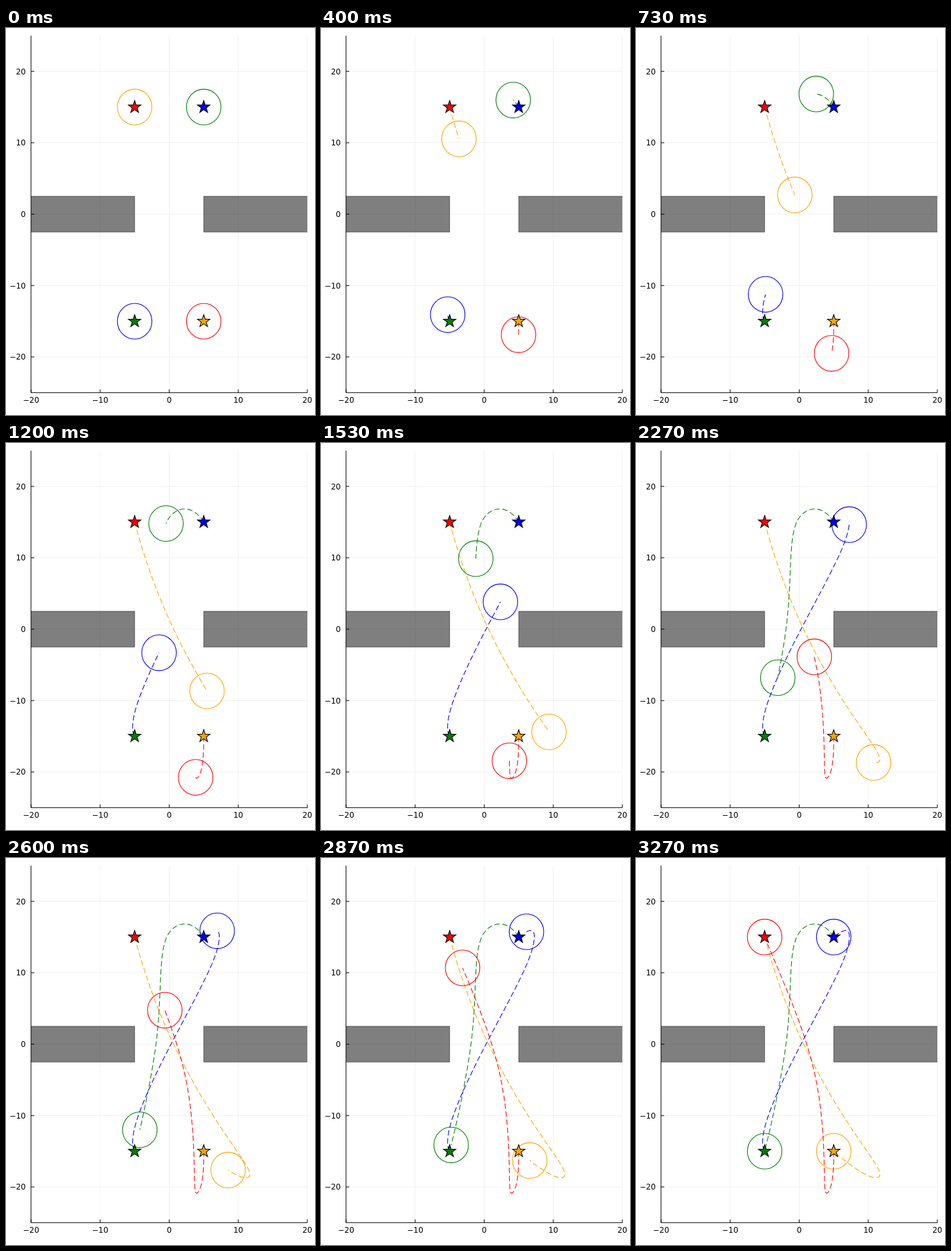
Recreate the animation shown at these times as an HTML page with a canvas. Size 480 by 600 pixels, loop 3.34 s.

```html
<!DOCTYPE html>
<html lang="en">
<head>
<meta charset="utf-8">
<title>Four agents swapping places</title>
<style>
html, body { margin: 0; width: 100%; height: 100%; overflow: hidden; background: #fff; }
canvas { display: block; }
</style>
</head>
<body>
<canvas id="stage" width="480" height="600"></canvas>
<script>
const ctx = document.getElementById('stage').getContext('2d');
const LOOP = 3340, STEPS = 50, RADIUS = 2.5, DASH = 4.16;
const SX = 10.73, SY = 11.07;
const px = x => 253.5 + SX * x;
const py = y => 288.6 - SY * y;
const LEFT = px(-20), RIGHT = px(20), TOP = py(25), BOTTOM = py(-25);

// Each agent crosses to the opposite corner through a few key points
const KEYS = [0, 11, 18, 29, 34, 43, STEPS - 1];
const agents = [
  agent('orange', -5, 15, [-0.63, 2.69], [5.48, -8.65], [11.67, -18.07], [10.77, -18.67], [6.6, -16.3]),
  agent('green', 5, 15, [2.47, 16.83], [-0.46, 14.79], [-1.77, 1.1], [-3.1, -6.8], [-4.78, -14.12]),
  agent('blue', -5, -15, [-4.87, -11.23], [-1.47, -3.31], [6.18, 11.22], [7.24, 14.64], [6.12, 15.74]),
  agent('red', 5, -15, [4.69, -19.5], [3.83, -20.76], [3.38, -11.91], [2.19, -3.88], [-3.13, 10.68])
];

function agent(color, x, y, ...via) {
  const goal = [-x, -y];
  const points = [[x, y], ...via, goal];
  const fx = spline(KEYS, points.map(p => p[0]));
  const fy = spline(KEYS, points.map(p => p[1]));
  const path = Array.from({ length: STEPS }, (_, k) => [px(fx(k)), py(fy(k))]);
  return { color, goal, path };
}

// Cubic spline that starts and ends at rest
function spline(ts, vs) {
  const n = ts.length;
  const m = new Array(n).fill(0);
  for (let pass = 0; pass < 60; pass++) {
    for (let i = 1; i < n - 1; i++) {
      const a = 1 / (ts[i] - ts[i - 1]), b = 1 / (ts[i + 1] - ts[i]);
      const rhs = 3 * ((vs[i] - vs[i - 1]) * a * a + (vs[i + 1] - vs[i]) * b * b);
      m[i] = (rhs - a * m[i - 1] - b * m[i + 1]) / (2 * (a + b));
    }
  }
  return t => {
    let i = 0;
    while (i < n - 2 && t > ts[i + 1]) i++;
    const h = ts[i + 1] - ts[i], u = (t - ts[i]) / h, w = 1 - u;
    return vs[i] * w * w * (1 + 2 * u) + vs[i + 1] * u * u * (3 - 2 * u)
      + h * u * w * (m[i] * w - m[i + 1] * u);
  };
}

function line(x1, y1, x2, y2) {
  ctx.beginPath();
  ctx.moveTo(x1, y1);
  ctx.lineTo(x2, y2);
  ctx.stroke();
}

function label(v, x, y, align) {
  ctx.textAlign = align;
  ctx.fillText(String(v).replace('-', '\u2212'), x, y);
}

function drawAxes() {
  ctx.lineWidth = 1;
  ctx.font = '12px "DejaVu Sans", sans-serif';
  for (let v = -20; v <= 20; v += 10) {
    const x = px(v), y = py(v);
    ctx.strokeStyle = 'rgba(0,0,0,0.06)';
    line(x, TOP, x, BOTTOM);
    line(LEFT, y, RIGHT, y);
    ctx.strokeStyle = ctx.fillStyle = '#000';
    line(x, BOTTOM, x, BOTTOM - 5);
    line(LEFT, y, LEFT + 5, y);
    label(v, x, 581, 'center');
    label(v, 30.7, y + 4.4, 'right');
  }
  line(LEFT, TOP, LEFT, BOTTOM);
  line(LEFT, BOTTOM, RIGHT, BOTTOM);
}

// The walls run on past the plot and are cut at its edge
function drawWalls() {
  ctx.save();
  ctx.beginPath();
  ctx.rect(LEFT, TOP, RIGHT - LEFT, BOTTOM - TOP);
  ctx.clip();
  ctx.fillStyle = ctx.strokeStyle = 'rgba(0,0,0,0.5)';
  for (const x of [-25, 5]) {
    const box = [px(x), py(2.5), 20 * SX, 5 * SY];
    ctx.fillRect(...box);
    ctx.strokeRect(...box);
  }
  ctx.restore();
}

function drawAgent({ color, path }, k) {
  ctx.strokeStyle = color;
  ctx.lineWidth = 1.1;
  ctx.setLineDash([2 * DASH, DASH]);
  ctx.beginPath();
  for (let i = 0; i <= k; i++) ctx.lineTo(...path[i]);
  ctx.stroke();
  ctx.setLineDash([]);
  ctx.beginPath();
  ctx.ellipse(...path[k], RADIUS * SX, RADIUS * SY, 0, 0, 2 * Math.PI);
  ctx.stroke();
}

function drawStar({ color, goal }) {
  ctx.beginPath();
  for (let i = 0; i < 10; i++) {
    const r = i % 2 ? 4 : 10.2, a = i * Math.PI / 5;
    ctx.lineTo(px(goal[0]) + r * Math.sin(a), py(goal[1]) - r * Math.cos(a));
  }
  ctx.closePath();
  ctx.fillStyle = color;
  ctx.strokeStyle = '#000';
  ctx.lineWidth = 1.1;
  ctx.fill();
  ctx.stroke();
}

function draw(k) {
  ctx.fillStyle = '#fff';
  ctx.fillRect(0, 0, 480, 600);
  drawAxes();
  drawWalls();
  agents.forEach(a => drawAgent(a, k));
  agents.forEach(drawStar);
}

const start = performance.now();

// 15 steps per second, each starting on a whole 10 ms tick
function tick() {
  const t = (performance.now() - start) % LOOP;
  draw(Math.min(STEPS - 1, Math.floor((Math.floor(t / 10) + 0.5) * 0.15)));
  requestAnimationFrame(tick);
}
tick();
</script>
</body>
</html>
```
